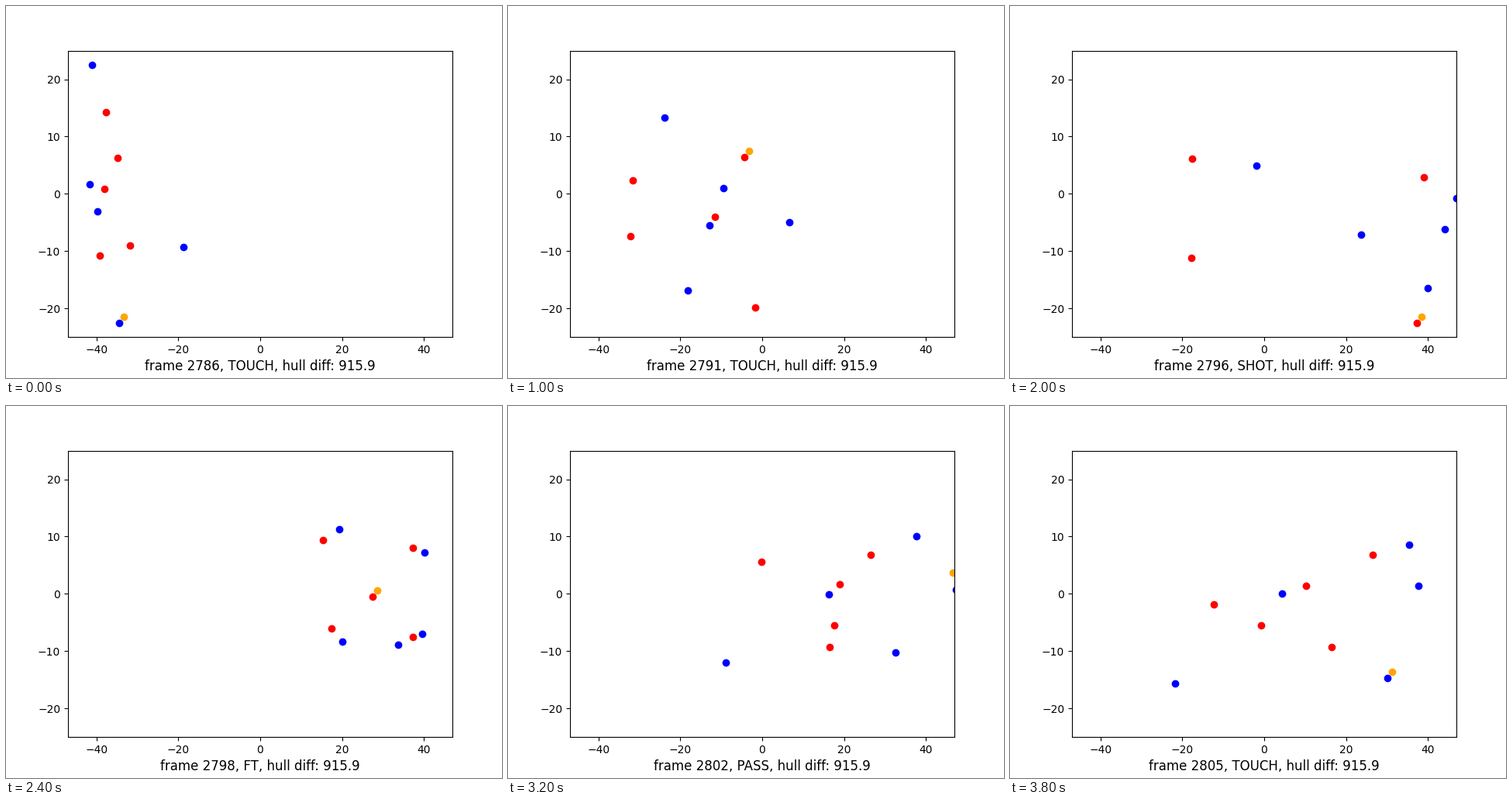
A matplotlib script for the animation above (4000 ms loop, 640 by 480 pixels).

```python
import numpy as np
import matplotlib.pyplot as plt
from matplotlib.animation import FuncAnimation

plt.rcParams["font.family"] = "DejaVu Sans"

FIRST, STEP_MS = 2786, 200
EVENTS = ("TOUCH SHOT DREB TOUCH PASS TOUCH DRIBBLE DRIBBLE PASS TOUCH "
          "SHOT FOUL FT FT FT TOUCH PASS TOUCH PASS TOUCH").split()

# Play stands still after a rebound or a free throw, else one beat per event.
CLOCK = np.cumsum([0] + [e not in ("DREB", "FT") for e in EVENTS[:-1]])

# Turning points of play: start, rebound, fast break, shot, free throws,
# outlet pass, end. Each player runs straight between them (x + y*j, pixels).
TURNS = CLOCK[[0, 3, 8, 10, 14, 16, 19]]
BLUE = [
    [111+76j, 157+96j, 270+216j, 318+206j, 430+159j, 414+243j, 351+242j],
    [108+230j, 121+240j, 514+228j, 561+288j, 537+294j, 578+237j, 527+232j],
    [118+265j, 112+275j, 482+296j, 539+364j, 506+308j, 500+318j, 487+351j],
    [229+311j, 245+306j, 540+238j, 576+248j, 540+189j, 527+168j, 515+179j],
    [146+409j, 148+405j, 357+310j, 453+295j, 434+304j, 281+331j, 213+358j],
]
RED = [
    [129+137j, 158+177j, 525+223j, 534+221j, 525+183j, 468+192j],
    [144+196j, 130+239j, 207+204j, 235+197j, 409+173j, 327+201j, 263+256j],
    [127+236j, 124+277j, 210+328j, 234+325j, 420+287j, 421+283j, 324+283j],
    [121+322j, 124+276j, 482+265j, 600+230j, 525+298j, 415+311j],
    [160+309j, 208+380j, 486+403j, 525+409j, 473+246j, 428+230j, 382+232j],
]

# Who has the ball at each event: blue players 0-4, red players 5-9.
HOLDER = [int(c) for c in "44777555599999911332"]
IN_HAND, RELEASE = 6 - 8j, 0.2

fig = plt.figure(figsize=(6.4, 4.8), dpi=100, facecolor="white")
ax = fig.add_axes([0.125, 0.11, 0.775, 0.77])
ax.set(xlim=(-47, 47), ylim=(-25, 25),
       xticks=range(-40, 41, 20), yticks=range(-20, 21, 10))
blue, red, ball = (ax.scatter([], [], c=c) for c in ("blue", "red", "orange"))
caption = ax.text(0.5, -0.103, "", size=12, ha="center", va="center",
                  transform=ax.transAxes)


def to_court(z):
    return np.column_stack([(z.real - 328) * 94 / 496,
                            (242.4 - z.imag) * 50 / 369.6])


def locate(path, t):
    return np.interp(t, TURNS[:len(path)], path)


def ball_at(i, players):
    """Ball beside its holder, or just released towards the next one."""
    pos = players[HOLDER[i]]
    if EVENTS[i] == "PASS":
        pos += RELEASE * (players[HOLDER[i + 1]] - pos)
    return pos + IN_HAND


def draw(i):
    players = np.array([locate(path, CLOCK[i]) for path in BLUE + RED])
    blue.set_offsets(to_court(players[:5]))
    red.set_offsets(to_court(players[5:]))
    ball.set_offsets(to_court(np.array([ball_at(i, players)])))
    caption.set_text(f"frame {FIRST + i}, {EVENTS[i]}, hull diff: 915.9")
    return blue, red, ball, caption


anim = FuncAnimation(fig, draw, frames=len(EVENTS), interval=STEP_MS,
                     repeat=True, repeat_delay=0)
plt.show()
```
